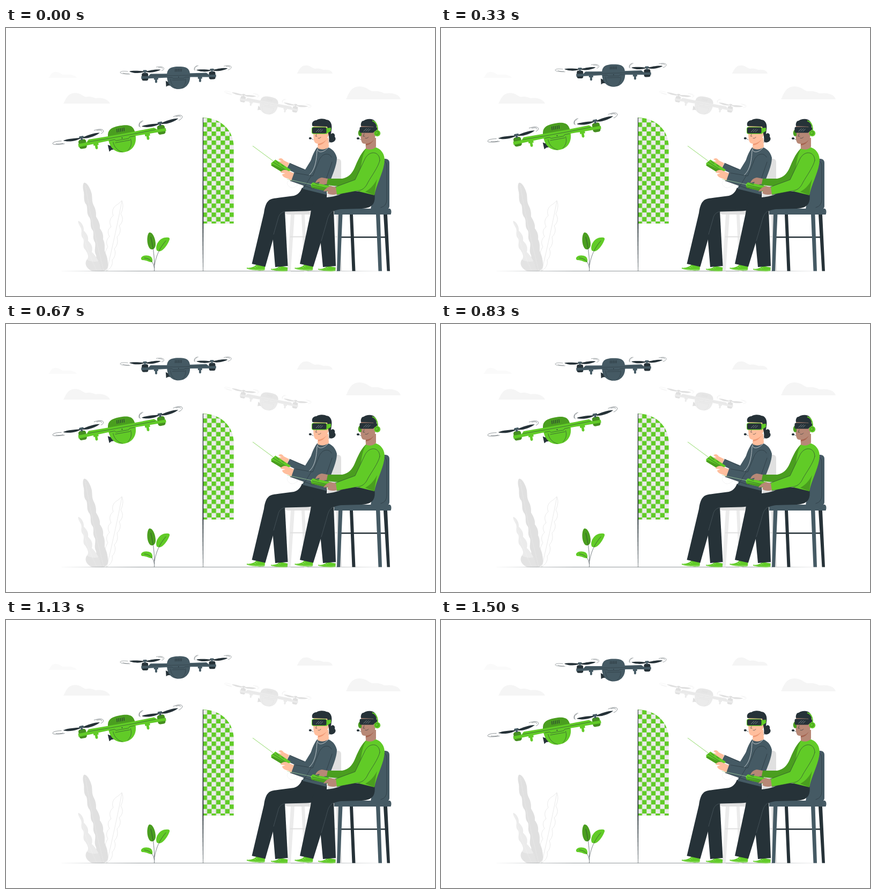
An HTML page for the animation above (1.54 s loop, 800 by 500 pixels).

```html
<!DOCTYPE html>
<html lang="en">
<head>
<meta charset="utf-8">
<title>Drone pilots</title>
<style>
html, body { margin: 0; width: 100%; height: 100%; overflow: hidden; background: #fff; }
svg { display: block; width: 100vw; height: 100vh; }
.body { fill: var(--body); }
.dome { fill: var(--dome); }
.motor { fill: var(--motor); }
.blade { fill: var(--blade); }
.hub { fill: var(--hub); }
.seam { fill: none; stroke: var(--blade); stroke-width: .45; }
.swirl { fill: none; stroke: var(--blade); stroke-width: .4; stroke-linecap: round; }
.green { --body: #61cb27; --dome: #4a9e1f; --motor: #458f20; --blade: #263238; --hub: #455a64; }
.slate { --body: #455a64; --dome: #455a64; --motor: #263238; --blade: #263238; --hub: #455a64; }
.pale { --body: #ebebeb; --dome: #e6e6e6; --motor: #e0e0e0; --blade: #e0e0e0; --hub: #e0e0e0; }
.g { fill: #61cb27; }
.dg { fill: #4a9e1f; }
.k { fill: #263238; }
.s { fill: #455a64; }
.l1 { fill: #e0e0e0; }
.l2 { fill: #ebebeb; }
.l3 { fill: #f5f5f5; }
.skin { fill: #ffbe9d; }
.tan { fill: #b78876; }
.line { fill: none; stroke: #263238; stroke-width: .6; stroke-linecap: round; stroke-linejoin: round; }
.vein { fill: none; stroke: #fff; stroke-width: .4; opacity: .5; }
</style>
</head>
<body>
<svg viewBox="0 0 800 500" preserveAspectRatio="none">
<defs>
  <g id="prop">
    <rect class="hub" x="-3.600" y="-1.300" width="7.200" height="2.800" rx="1"/>
    <rect class="hub" x="-1.600" y="0" width="3.200" height="5"/>
    <path class="blade" d="M-2 1C-9 .2-22-1.400-29 .5C-25 3.200-15 4.600-8 3.600L-2 2.400ZM2 1C9-.8 22-3 29.500-1.300C25 1.400 15 3.700 8 3.300L2 2.400Z"/>
  </g>
  <g id="drone">
    <rect class="motor" x="-68.500" y="4" width="12" height="14.500" rx="3.500"/>
    <rect class="motor" x="56.800" y="4" width="12" height="14.500" rx="3.500"/>
    <path class="body" d="M-46 12H-38V17H-40V22L-42 23.500L-44 22V17H-46ZM36 12H44V17H42V22L40 23.500L38 22V17H36Z"/>
    <path class="blade" d="M-24 19.500L-20.500 21.500L-13 18V28.500L-20 28.500L-23.500 30.500Z"/>
    <path class="dome" d="M-21.500 14C-22.500-2-17-6.500 0-6.500S22.500-2 21.500 14Z"/>
    <path class="body" d="M-69.500 10H-56L-52 6L-18 6.500H18L52 6L57 10H70V14.500L20 13.500H-20L-69.500 15Z"/>
    <path class="body" d="M-21.500 11H21.500C22 25 14 35.500 0 35.500S-22 25-21.500 11Z"/>
    <path class="seam" d="M-54 9.500L-18 10H18L54 9.500M-20 13.500H-12L-10 15.500H10L12 13.500H20M-15 16.500C-15 25-10 32-3 35M13 16.500C14 25 10 31 5 34M-12 18.500H12"/>
    <path class="seam" style="stroke-width:.9" d="M-6 3L-5.500-2.500M-3.200 3L-2.700-2.500M-.4 3L.1-2.500M2.400 3L2.900-2.500M5.200 3L5.700-2.500"/>
    <circle class="blade" cx="0" cy="13" r=".8"/>
    <use href="#prop" x="-62.500"/>
    <use href="#prop" x="62.500"/>
    <path class="swirl" d="M-94.500 .7C-103.500-.8-108.500 .2-108.500 2.200S-101.500 5.500-90.500 5.800M-103.500 3.300C-99.500 4.700-95.500 5-92.500 4.700"/>
    <path class="swirl" d="M-41-6.500C-32-8-26-6-27-2.500C-27.500-1-29-.2-31 .3M-37-5.600C-31-6-29-4.700-29.500-3"/>
    <path class="swirl" d="M85-5.500C93-7.500 99-6 98.800-3C98.500-1 96 .8 92.500 1.600M89-5C94-5.500 96.500-4.500 96-3"/>
    <path class="swirl" d="M35-6.200C31-6 29.500-2 31 1.500M37-7.500C32-8 29-4 29.500 0"/>
  </g>
  <pattern id="check" x="366.600" y="361" width="16.800" height="16.800" patternUnits="userSpaceOnUse">
    <rect class="l2" width="16.800" height="16.800"/>
    <path class="g" d="M0 0H8.400V16.800H16.800V8.400H0Z"/>
  </pattern>
  <g id="shoe">
    <path class="g" d="M0 4.800C7 5.500 14 3.500 18-1.500L34 2L33.500 9C28 11 7 9.500 0 6.500Z"/>
    <path d="M1 6.300C10 8.500 24 8.800 33 7.800M13 2.500L17 5M16 .5L20 3.500" fill="none" stroke="#fff" stroke-width=".6" opacity=".6"/>
  </g>
  <g id="goggles">
    <rect class="k" width="26.500" height="11" rx="2.500"/>
    <path d="M7 8.500L13 3M11 8.500L17 3M15 8.500L20 4" stroke="#8d999f" stroke-width=".8"/>
  </g>
</defs>

<g class="l3">
  <path d="M80 93V91.500C84 89 84 81.500 93 81.700C101 82 103 88 109 87C121 85.500 131 89 132 93Z" fill="#fafafa"/>
  <path d="M107 141C111 136 113 121.300 129 121.300C141 121.500 144 129 150 128.500C158 127 163 130 167 131C181 129 191 134 194 141Z"/>
  <path d="M542.500 85C546 81 548 69.500 560 69.800C568 70 572 76 577 76C584 74.500 588 77 592 78C602 76.500 608 80 609 85Z"/>
  <path d="M634 133C638 127 641 109 659 109C673 109 678 118.500 685 118C695 116.500 702 120 706 122C723 119.500 734 125 736 133Z"/>
</g>

<path class="l1" d="M146 288.500C151 288 158 300 160 310C161 318 160 322 163 330C168 339 168 345 168 352C173 360 176 367 175 374C180 380 182 387 181 394C185 402 184 409 184 416C188 424 191 436 190 445C188 452 183 453.500 178 453.500H166C161 441 170 432 168 424C163 415 168 408 166 400C160 391 165 385 162 378C155 370 160 362 156 354C149 346 153 338 150 330C143 322 147 312 144.500 304C143 297 143 290 146 288.500Z"/>
<path class="l2" d="M135 360C140 361 146 370 145 378C152 385 154 390 153 397C161 405 162 410 160 418C169 426 174 436 179 453.500H160C150 449 145 439 151 432C156 426 151 419 148 414C141 407 147 400 144 393C138 387 142 381 140 374C137 368 133 361 135 360Z"/>
<path class="l1" d="M151 432C160 438 176 437 184 430C190 438 191 449 183 453.500H162C151 450 146 440 151 432Z" opacity=".75"/>
<path class="vein" d="M148 294C155 335 164 380 182 452M137 364C146 395 153 421 169 452"/>
<g fill="none" stroke="#e0e0e0" stroke-width=".7">
  <path d="M216 322C220 331 217 341 214 347C220 355 217 364 211 369C216 378 211 386 207 390C210 400 206 408 202 412C206 421 202 429 198 433C200 442 194 450 187 453.500C186 445 188 435 186 428C182 420 188 412 190 408C185 400 189 392 193 389C188 381 191 374 196 371C191 361 195 354 200 350C196 341 201 333 208 329C211 327 214 324 216 322Z"/>
  <path d="M216 323C209 361 198 410 188 453"/>
</g>

<path class="dg" d="M266.500 382C273 379 279 393 279 404C279 410 275 413.500 271 413C263 411 261 389 266.500 382Z"/>
<path class="g" d="M281.500 415.500C277 407 285 392 297 391C303 390 306 391 305 394.500C302 404 292 418 285 416.500Z"/>
<path class="g" d="M252 429C254 423.500 264 423 270 426.500C273 429 274 434 272.500 437C266 437 262 432.500 254 433C252.500 432.500 251.500 431 252 429Z"/>
<path class="line" d="M276.500 453C277.500 430 275 411 270 390M277 442C280 425 286 411 298 397M276.500 447C275 437 269 430 258 429"/>

<path class="k" d="M98 453.500L250 453.150H560L716 453.500L560 453.800H250Z"/>
<path d="M368 167C400 168 424.500 190 424.700 222V364.700H368Z" fill="url(#check)"/>
<path class="k" d="M366.900 167H367.900L368.300 365L367.600 453.500H367.100L366.400 365Z"/>

<!-- rear chair -->
<path class="l1" d="M606 244H619Q625 244 625 251V338H598Z"/>
<path class="l1" d="M518 340H622V345Q620 348 616 348H526Q519 347 518 340Z"/>
<path class="l2" d="M531 348H538L531 453.500H524.500ZM551 348H557L562 453.500H556ZM606 348H612L616 453.500H610Z"/>
<path class="l1" d="M616 348H623L626 453.500H619.500ZM530 388.500H622V390.500H530Z"/>

<!-- rear pilot -->
<use href="#shoe" x="449" y="442.500"/>
<use href="#shoe" transform="translate(494 445) scale(.92 .9)"/>
<path class="k" d="M494 350L502 446L525.500 444L520 341Z"/>
<path class="k" d="M552 298L598 306C601 330 585 341 560 341.500L521 342.500C510 344 509 357 506 366L483.500 445.500L458.500 440L481 345C484 325 489 318.500 503 317.500L537 313C544 311 549 306 552 298Z"/>
<path class="s" d="M580 223C596 217 613 224 617 242C617 262 602 285 597 311L553 300L564 268C567 248 573 232 580 223Z"/>
<path class="s" d="M581 224L571 243L558 264L529 252L523 263L554 277L574 272Z"/>
<path class="skin" d="M582 205H601L602 222C596 227 587 228 581 224Z"/>
<path class="skin" d="M573.500 190C573 201 573 211 577 214.500C583 218 595 214 599 205L606 193L600 180H574Z"/>
<path d="M582 216C589 215 594 212 598 208C594 214 589 218 582 219Z" fill="#f09a76"/>
<path class="k" d="M571.500 183C569 177 573 172 579 172C584 168 594 169 597 171C605 171 609 180 607 190L606 198C610 194 614.500 198 613 203C617 207 613 213 607 213.500C603 214 602 211 603 207L601 197L599 184C590 184 582 183 571.500 183Z"/>
<path class="g" d="M596 187L606 186V192L597 198Z"/>
<rect class="g" x="570" y="184.500" width="28.500" height="13.300" rx="3.500"/>
<use href="#goggles" x="571" y="185.500"/>
<path class="line" d="M579 198L577.500 202H580M582 205.500C584 206.500 586 205.500 587 203.500M602.500 200V214M569 206L573 208.500"/>
<ellipse class="k" cx="567.300" cy="205.700" rx="2.500" ry="2"/>
<path d="M581 225C580 232 590 235 601 223M580 228C579 249 576 268 562 277" fill="none" stroke="#dfe3e5" stroke-width=".8"/>
<path d="M562 277C546 292 536 303 528 296C520 288 527 283 535 282" fill="none" stroke="#efefef" stroke-width=".7"/>
<path class="s" d="M607 238C598 231 587 236 583 249L572 276L537 270L530 285L570 299C584 302 591 297 595 287L608 257Z"/>
<path class="line" d="M607 241C602 231 588 234 583 249L572 276L537 270M608 250L596 285C592 297 585 302 570 299L530 285M529 252L555 264M569 276L555 299"/>
<path class="skin" d="M528 252L518 247C515 242 511 242 508 245L514 249C509 248 506 249 506 252L516 259L524 262Z"/>
<path class="g" d="M494.500 252L502.500 245.500L531 264.500L526 270L515 269L494.500 256.500Z"/>
<path class="dg" d="M494.500 256.500L497 254L527 268L526 270L515 269Z"/>
<path d="M460 220L498 248" stroke="#61cb27" stroke-width=".7"/>
<path class="line" d="M498 250L523 266M504 249L509 253M514 255L518 258"/>
<path class="skin" d="M537 271L525 266C519 263 513 266 512 270L521 271L515 273C515 277 521 280 526 281L532 285Z"/>

<!-- front chair -->
<path class="s" d="M696 244H708Q715 244.500 715 252V332Q715 338 709 338H680Z"/>
<path class="line" d="M703 248C709 249 710 253 710 260V320Q710 332 699 335"/>
<path class="k" d="M641 348H647L651.500 453.500H645.500ZM704 348H711L716 453.500H710.500Z"/>
<path class="k" d="M622 389H713V391.500H622Z"/>
<path class="s" d="M620 348H627.500L623 453.500H617ZM690 348H697.500L701 453.500H694.500Z"/>
<path class="s" d="M612 337H716C719 339 719 344 717.500 348H612Z"/>

<!-- front pilot -->
<use href="#shoe" x="538.500" y="442.500"/>
<use href="#shoe" transform="translate(582 445) scale(.96 .9)"/>
<path class="k" d="M582 350L591 446L615 444L611 341Z"/>
<path class="k" d="M634 303L687 307C690 327 684 336 663 337L625 338C604 340 602 351 598 365L573 445.500L548 440L568 346C571 325 577 317.500 591 316.500C609 315.500 626 312 634 303Z"/>
<path class="line" d="M612 341C601 344 600 356 597 366L588 397" style="stroke:#56646b"/>
<path class="line" d="M499 385L507 357C509 347 514 343 521 342.500" style="stroke:#56646b"/>
<path class="dg" d="M673 223C662 232 656 247 650 261C645 272 638 279 627 281L600 281L597 292C620 297 650 297 670 287Z"/>
<path class="g" d="M672 224C690 217 705 228 706 245C706 266 691 290 687 312L650 303L662 258C664 243 667 232 672 224Z"/>
<path class="dg" d="M692 282C686 293 680 300 670 305.500L687 312C688 301 690 291 692 282Z"/>
<path class="tan" d="M670 205H690L690 222C685 227 677 228 671 225Z"/>
<path class="tan" d="M661.500 188C661 200 661 211 665 215C671 218 684 214 688 205L691 186L684 178H663Z"/>
<path d="M671 216C679 215 683 212 686 208C683 214 678 218 671 219Z" fill="#a5634f"/>
<path class="k" d="M662 183C661 178 663 173 667 173C671 169 684 168 688 174C692 177 691 184 690 192L686 194L685 184Z"/>
<path d="M683 173C690 175 693 181 693 191" fill="none" stroke="#61cb27" stroke-width="2"/>
<path class="dg" d="M661 189C656 190 655 200 660 202L663 201V190Z"/>
<use href="#goggles" x="659.500" y="184.500"/>
<path class="k" d="M685 187L692 185.500V190L685 194Z"/>
<circle class="g" cx="692.300" cy="196.300" r="5.900"/>
<circle class="dg" cx="691.800" cy="196" r="3.700"/>
<circle class="g" cx="691.300" cy="195.700" r="2.300"/>
<path class="line" d="M668 197L666 202H669M670 205.500C672 206.500 675 205 676 203.500M658 206L662 208.500"/>
<ellipse class="k" cx="656.500" cy="206" rx="2.600" ry="2"/>
<path class="g" d="M698 241C690 228 674 232 668 247L651 283L613 297L617 311L654 304C665 303 671 297 675 288L696 252Z"/>
<path class="line" d="M697 247C697 229 676 227 668 247L651 283L613 297M697 247C694 260 681 277 675 288C670 299 664 303 654 304L617 311"/>
<path class="tan" d="M600 281L589 279C583 280 578 284 577 289L585 287L583 291L592 292L598 291Z"/>
<path class="g" d="M568 292L572 288L607 295L609 301L600 305L570 298Z"/>
<path class="dg" d="M569 295L606 301L600 305L570 298Z"/>
<path d="M524 282L570 292" stroke="#a8dda0" stroke-width=".7"/>
<path class="line" d="M571 293L603 300M577 290L583 292"/>
<path class="tan" d="M615 297L605 295C599 297 594 301 592 305L601 304L599 308C603 311 610 312 617 310Z"/>

<use href="#drone" class="pale" transform="translate(492 133.500) rotate(11) scale(.79)"/>
<g id="slate"><use href="#drone" class="slate" transform="translate(321.500 78.500) rotate(-1.200)"/></g>
<g id="green"><use href="#drone" class="green" transform="translate(213.700 190) rotate(-10.300) scale(1.19)"/></g>
</svg>
<script>
const LOOP = 1540, FPS = 24, LIFT = 10, LEAD = 40;
const drones = ["slate", "green"].map(id => document.getElementById(id));

// linear hover, held at 24 steps per second
function hover(ms) {
  const held = Math.floor((ms + 4.9) * FPS / 1000) * 1000 / FPS;
  const phase = (held + LEAD) % LOOP / LOOP;
  return 0.5 - LIFT * (1 - Math.abs(1 - 2 * phase));
}

function draw(ms) {
  const y = hover(ms % LOOP).toFixed(3);
  drones.forEach(d => d.setAttribute("transform", `translate(0 ${y})`));
}

const start = performance.now();
function tick() {
  draw(performance.now() - start);
  requestAnimationFrame(tick);
}
draw(0);
requestAnimationFrame(tick);
</script>
</body>
</html>
```
